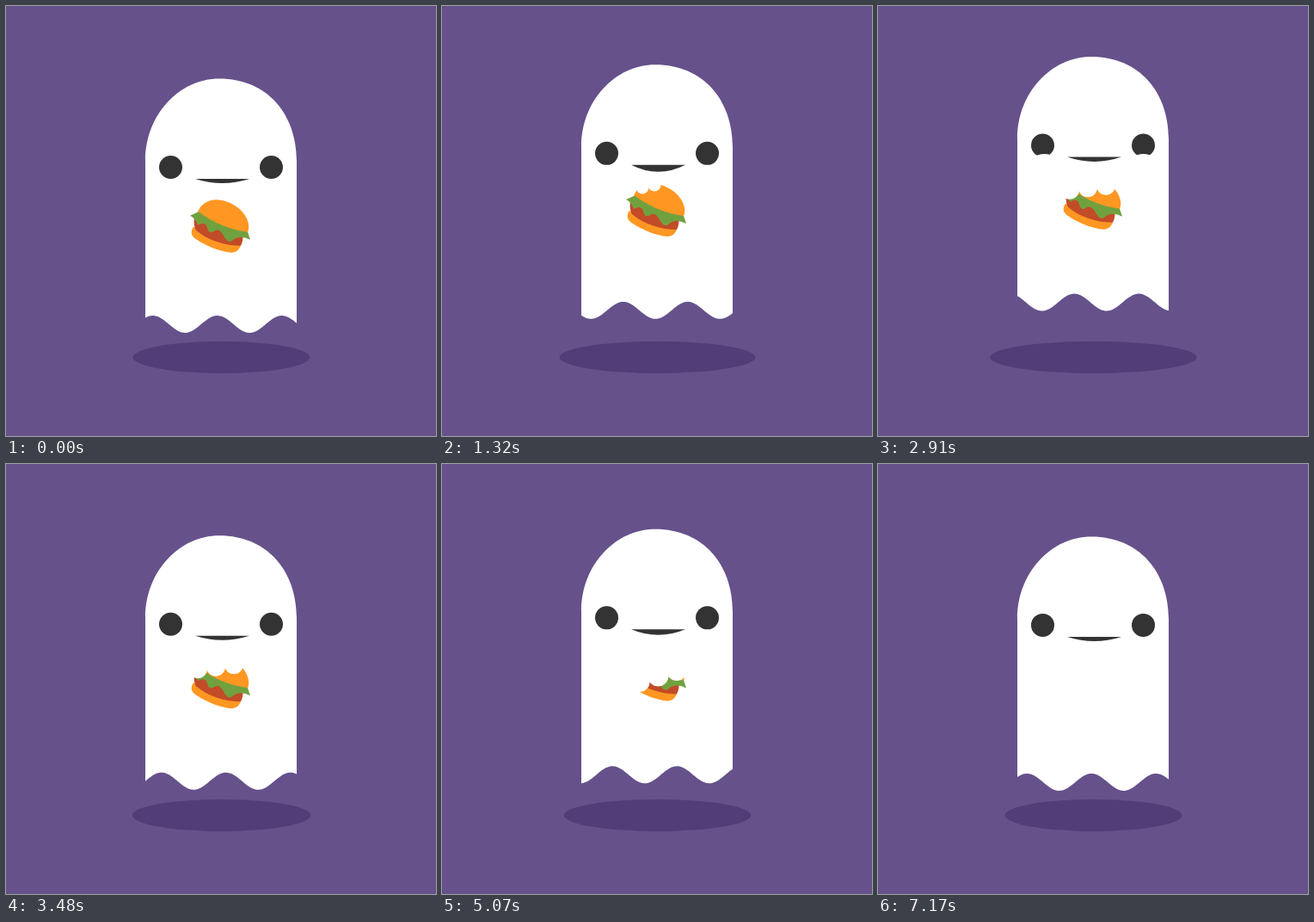
Animation, 500 px wide and 500 px high, one loop 7200 ms. Source, as an HTML page:

```html
<!DOCTYPE html>
<html lang="en">
<head>
<meta charset="utf-8">
<title>Hungry ghost</title>
<style>
  html, body { margin: 0; width: 100%; height: 100%; overflow: hidden; background: #66518b; }
  svg { display: block; width: 100vw; height: 100vh; }
</style>
</head>
<body>
<svg viewBox="0 0 500 500">
  <defs>
    <mask id="bitten" maskUnits="userSpaceOnUse" x="200" y="210" width="100" height="90">
      <rect x="200" y="210" width="100" height="90" fill="#fff"/>
      <g id="bites"></g>
    </mask>
  </defs>
  <rect width="500" height="500" fill="#66518b"/>
  <ellipse id="shadow" cx="250.5" cy="408.5" ry="18.5" fill="#523d78"/>
  <g id="ghost">
    <path id="body" fill="#fff"/>
    <g fill="#333">
      <circle cx="191.5" cy="187.5" r="13.5"/>
      <circle cx="308.5" cy="187.5" r="13.5"/>
      <path id="mouth"/>
    </g>
    <g id="cheeks" fill="#fff">
      <ellipse cx="193.5" cy="213" rx="17" ry="12"/>
      <ellipse cx="308.5" cy="213" rx="17" ry="12"/>
    </g>
  </g>
  <g id="burger">
    <g mask="url(#bitten)">
      <path fill="#ff9722" d="M218 257C214 263 215 268 222 272C234 280 250 286 262 287C268 287 272 283 273 278Z"/>
      <path fill="#c24b28" d="M219 246C218 252 219 258 221 261C235 273 255 279 273 279C275 275 276 271 275 267Z"/>
      <path fill="#ff9722" d="M223 241C225 231 235 225 246 225.5C264 227 280 240 282 254C283 260 281 265 278 266Q248 260 223 241Z"/>
      <path fill="#71a13f" d="M214 244L224 239.5Q250 259 281 263L284 272Q278 269 273 269T263 273T253 267.5T242 262T234 258T223 255Q220 247 214 244Z"/>
    </g>
  </g>
</svg>
<script>
const LOOP = 7200, CYCLE = 1800, STEP = 30, BITE = 630;
const RISE = 29.2, WAVE = 75, HEM = 370, LEFT = 162, RIGHT = 338;
const $ = id => document.getElementById(id);

// A row of round teeth marks, repeated upwards to clear what is above it
function biteRow(x0, y0, x1, y1, teeth, r) {
  const g = document.createElementNS("http://www.w3.org/2000/svg", "g");
  for (let i = 0; i < teeth; i++) {
    const u = i / (teeth - 1);
    const x = x0 + (x1 - x0) * u, y = y0 + (y1 - y0) * u;
    for (let up = 0; up <= 30; up += 5) {
      g.innerHTML += `<circle cx="${x}" cy="${y - up}" r="${r}"/>`;
    }
  }
  return $("bites").appendChild(g);
}
const bites = [
  biteRow(233, 230, 247, 227, 2, 7.5),
  biteRow(223, 241, 265, 236, 3, 11),
  biteRow(208, 271, 273, 251.5, 4, 12)
];

function smooth(a, b, t) {
  const u = Math.min(1, Math.max(0, (t - a) / (b - a)));
  return u * u * (3 - 2 * u);
}
// Eases 0 to 1 over a..b and back over c..d
const bump = (t, a, b, c, d) => smooth(a, b, t) - smooth(c, d, t);
const lift = t => (1 - Math.cos(2 * Math.PI * t / CYCLE)) / 2;
const shift = (id, y) => $(id).setAttribute("transform", `translate(0 ${y})`);

function bodyPath(t) {
  const crest = 170.7 - WAVE * t / 900;
  let d = `M${LEFT} 180C${LEFT} 127 201 84.5 248 84.5C304 84.5 ${RIGHT} 126 ${RIGHT} 180`;
  for (let x = RIGHT; x >= LEFT; x -= 2) {
    const y = HEM - 10 * Math.cos(2 * Math.PI * (x - crest) / WAVE);
    d += `L${x} ${y.toFixed(2)}`;
  }
  return d + "Z";
}

function draw(t) {
  const p = t % CYCLE, v = lift(t);
  const eaten = Math.floor(t / CYCLE) + (p >= BITE ? 1 : 0);
  const raise = 43 * bump(p, 150, 600, 690, 1050);
  const chew = 3 * bump(p, 1050, 1300, 1340, 1600);
  const depth = 5 + 16 * bump(p, 150, 430, 750, 1020) + chew;
  const cheek = 58 * Math.max(0, v - 0.81);

  shift("ghost", -RISE * v);
  shift("cheeks", -cheek);
  shift("burger", -RISE * lift(t - 60) - raise);
  $("shadow").setAttribute("rx", 103 + 19.8 * v);
  $("body").setAttribute("d", bodyPath(t));
  $("mouth").setAttribute("d", `M220 201Q251.5 ${201 + 2 * depth} 283 201Z`);
  $("cheeks").setAttribute("visibility", cheek > 0 ? "visible" : "hidden");
  $("burger").setAttribute("visibility", eaten <= bites.length ? "visible" : "hidden");
  bites.forEach((g, i) => g.setAttribute("display", i < eaten ? "inline" : "none"));
}

const start = performance.now();
function tick() {
  const t = (performance.now() - start) % LOOP;
  draw(Math.floor(t / STEP) * STEP);
  requestAnimationFrame(tick);
}
draw(0);
requestAnimationFrame(tick);
</script>
</body>
</html>
```
